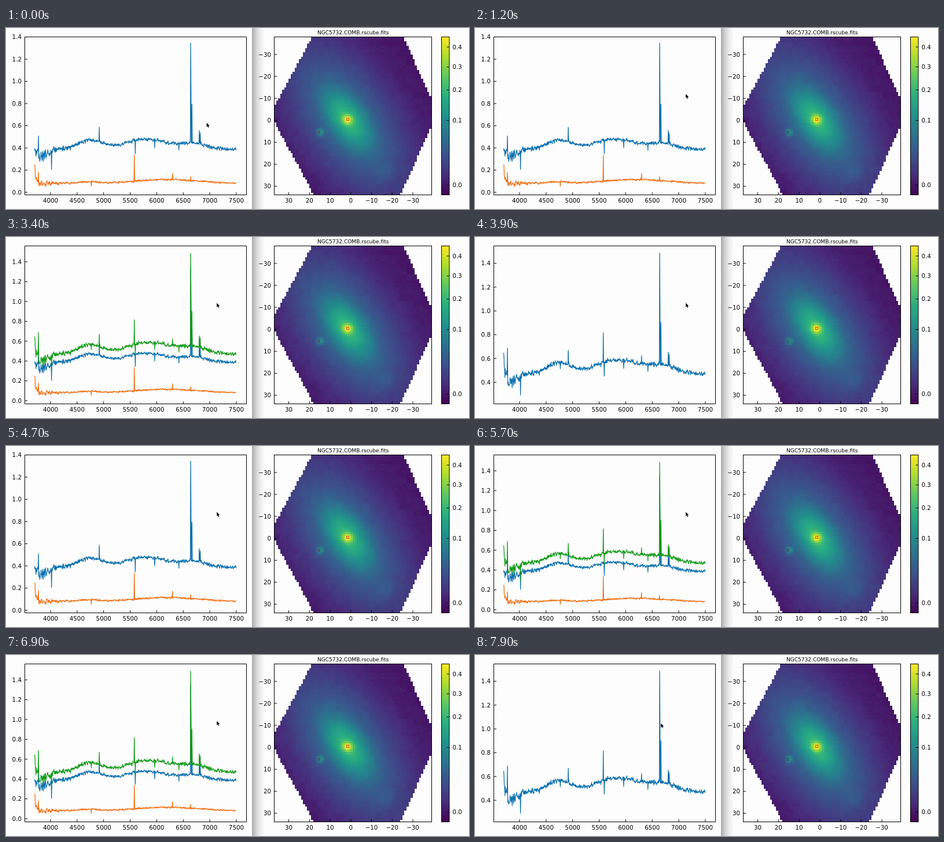
Recreate the animation shown at these times as an HTML page with a canvas. Size 800 by 314 pixels, loop 8000 ms.

```html
<!DOCTYPE html>
<html lang="en">
<head>
<meta charset="utf-8">
<title>Spectrum viewer</title>
<style>
  html, body { margin: 0; width: 100%; height: 100%; overflow: hidden; background: #fdfdfd; }
  canvas { display: block; }
</style>
</head>
<body>
<canvas id="stage" width="800" height="314"></canvas>
<script>
const LOOP = 8000, STEP = 100;
const BLUE = '#0a6fae', ORANGE = '#f26a0b', GREEN = '#109a16';
const VIRIDIS = ['#440154', '#472d7b', '#3b528b', '#2c728e', '#21918c', '#28ae80', '#5ec962', '#addc30', '#fde725'];
const TOP = 15.5, BOTTOM = 289.5, HEIGHT = BOTTOM - TOP;
const ctx = document.getElementById('stage').getContext('2d');

const hash = n => { const s = Math.sin(n * 12.9898) * 43758.5453; return s - Math.floor(s); };
const noise = n => hash(n) + hash(n + 0.37) - 1;
const bell = (x, center = 0, width = 1) => Math.exp(-(((x - center) / width) ** 2));
const smooth = p => { p = Math.min(1, Math.max(0, p)); return p * p * (3 - 2 * p); };
const signed = n => (n < 0 ? '\u2212' : '') + Math.abs(n);

// Spectra: smooth continuum, noise growing to the blue end, and narrow lines
const W0 = 3700, DW = 6, SAMPLES = 634;

function spectrum(continuum, noiseLevel, lines, seed) {
  const flux = Array.from({ length: SAMPLES }, (_, i) => {
    const w = W0 + i * DW;
    return continuum(w) + noiseLevel(w) * (noise(i + seed) + 0.7 * noise((i >> 1) + seed + 900));
  });
  for (const [w, height] of lines) flux[Math.round((w - W0) / DW)] = continuum(w) + height;
  return flux;
}

const galaxyFlux = spectrum(
  w => .388 + .08 * bell(w, 4750, 330) + .09 * bell(w, 5800, 550) + .05 * bell(w, 6700, 350) - .07 * bell(w, 3850, 130),
  w => .017 + .008 * bell(w, 4000, 600) + .04 * bell(w, 3820, 190),
  [[3772, .17], [4018, -.17], [4918, .13], [5595, -.12], [5962, -.07], [6418, -.06],
   [6640, .9], [6646, .5], [6664, .35], [6802, .12], [6820, .1]], 11);

const starFlux = spectrum(
  w => .08 + .015 * bell(w, 4700, 250) + .036 * bell(w, 6200, 800) + .16 * Math.exp((W0 - w) / 25),
  w => .009 + .025 * bell(w, 3700, 350),
  [[3772, .09], [4768, -.04], [5577, .235], [6298, .055], [6640, .035]], 407);

const sumFlux = galaxyFlux.map((f, i) => f + starFlux[i]);

const galaxy = [galaxyFlux, BLUE], star = [starFlux, ORANGE];
const MODES = {
  pair: { zero: 285, unit: 192.4, from: 0, curves: [galaxy, star] },
  all: { zero: 284, unit: 172.1, from: 0, curves: [galaxy, star, [sumFlux, GREEN]] },
  sum: { zero: 334.6, unit: 206.4, from: 2, curves: [[sumFlux, BLUE]] }
};
const SCHEDULE = [[7000, 'sum'], [5600, 'all'], [4200, 'pair'], [3500, 'sum'], [2100, 'all'], [0, 'pair']];

function viridis(v) {
  const p = Math.min(.999, Math.max(0, v)) * 8, i = Math.floor(p);
  return `color-mix(in srgb, ${VIRIDIS[i + 1]} ${(p - i) * 100}%, ${VIRIDIS[i]})`;
}

// Tilted elliptical disc with a bright core, a companion and a faint knot
function brightness(x, y, seed) {
  const dx = x - 590, dy = y - 159;
  const e = Math.hypot(.56 * dx + .83 * dy, (.83 * dx - .56 * dy) / .52);
  const spot = (cx, cy, r) => bell(Math.hypot(x - cx, y - cy) / r);
  return .05 + .33 * bell(e / 148) + .22 * Math.exp(-((e / 60) ** 3)) + .1 * bell(e / 24)
    + .33 * spot(590, 159, 8) + .27 * spot(543, 181, 6) + .06 * spot(653, 250, 14)
    + .01 * noise(seed) + .014 * noise(Math.floor(x / 11) * 31 + Math.floor(y / 11));
}

const insideField = (x, y) =>
  x > 463 + .54 * Math.max(0, Math.abs(y - 150) - 12) &&
  x < 735 - .45 * Math.max(0, Math.abs(y - 147) - 24);

function text(str, x, y, align, size = 10.3) {
  ctx.font = `${size}px "DejaVu Sans", sans-serif`;
  ctx.textAlign = align;
  ctx.fillStyle = '#000';
  ctx.fillText(str, x, y);
}

function line(x0, y0, x1, y1) {
  ctx.beginPath();
  ctx.moveTo(x0, y0);
  ctx.lineTo(x1, y1);
  ctx.stroke();
}

function frame(x, width) {
  ctx.strokeStyle = '#000';
  ctx.lineWidth = 1;
  ctx.strokeRect(x, TOP, width, HEIGHT);
}

function xTick(label, x) {
  line(x, BOTTOM, x, BOTTOM - 4.5);
  text(label, x, 303.2, 'center');
}

function yTick(label, axisX, y, side = -1) {
  line(axisX, y, axisX - side * 4.5, y);
  text(label, axisX + side * 5.5, y + 3.8, side < 0 ? 'right' : 'left');
}

function drawBackdrop() {
  ctx.fillStyle = '#fdfdfd';
  ctx.fillRect(0, 0, 800, 314);
  const shadow = ctx.createLinearGradient(425, 0, 447, 0);
  ['#ababab', '#d4d4d4', '#ededed', '#fdfdfd'].forEach((c, i) => shadow.addColorStop(i / 3, c));
  ctx.fillStyle = shadow;
  ctx.fillRect(425, 0, 22, 314);
}

function drawMap() {
  const cols = 76, rows = 72;
  const edgeX = col => Math.round(463 + col * 272 / cols);
  const edgeY = row => Math.round(TOP + row * HEIGHT / rows);
  for (let row = 0; row < rows; row++) {
    for (let col = 0; col < cols; col++) {
      const left = edgeX(col), top = edgeY(row), w = edgeX(col + 1) - left, h = edgeY(row + 1) - top;
      const x = left + w / 2, y = top + h / 2;
      if (!insideField(x, y)) continue;
      ctx.fillStyle = viridis(brightness(x, y, row * cols + col));
      ctx.fillRect(left, top, w, h);
    }
  }
  ctx.lineWidth = 1;
  ctx.strokeStyle = '#e0402c';
  ctx.strokeRect(588.5, 156.5, 4, 4);
  ctx.strokeStyle = '#6a3440';
  ctx.strokeRect(539.5, 179.5, 3, 3);

  frame(463.5, 272);
  for (let v = -30; v <= 30; v += 10) {
    xTick(signed(v), 595.8 - v * 3.575);
    yTick(signed(v), 463.5, 160.2 + v * 3.81);
  }
  text('NGC5732.COMB.rscube.fits', 599.7, 11, 'center', 9.05);
}

function drawColorbar() {
  const ramp = ctx.createLinearGradient(0, BOTTOM, 0, TOP);
  VIRIDIS.forEach((c, i) => ramp.addColorStop(i / 8, c));
  ctx.fillStyle = ramp;
  ctx.fillRect(752, TOP, 14, HEIGHT);
  frame(752.5, 13.5);
  [272.5, 160.5, 107.5, 67.5, 33].forEach((y, i) => yTick((i / 10).toFixed(1), 766, y, 1));
}

function drawSpectra({ zero, unit, from, curves }) {
  const toX = w => 77 + (w - 4000) * .0917;
  ctx.lineWidth = 1.25;
  ctx.lineJoin = 'round';
  for (const [flux, color] of curves) {
    ctx.strokeStyle = color;
    ctx.beginPath();
    flux.forEach((f, i) => ctx.lineTo(toX(W0 + i * DW), zero - f * unit));
    ctx.stroke();
  }
  frame(32.5, 383);
  for (let w = 4000; w <= 7500; w += 500) xTick(String(w), toX(w));
  for (let i = from; i <= 7; i++) yTick((i / 5).toFixed(1), 32.5, zero - i / 5 * unit);
}

const ARROW = new Path2D('M0 0V7.2L1.7 5.7L2.9 8.4L4.1 7.8L3 5.2H5.2Z');
function drawCursor(time) {
  const there = smooth((time - 100) / 800), back = smooth((time - 7300) / 500);
  ctx.save();
  ctx.translate(346.7 + 17.5 * there - 43.2 * back, 164.6 - 50 * there + 3.9 * back);
  ctx.lineWidth = 1;
  ctx.strokeStyle = '#fff';
  ctx.stroke(ARROW);
  ctx.fillStyle = '#000';
  ctx.fill(ARROW);
  ctx.restore();
}

// Everything but the spectra and the cursor stays the same
drawBackdrop();
drawMap();
drawColorbar();
const still = document.createElement('canvas');
still.width = 800;
still.height = 314;
still.getContext('2d').drawImage(ctx.canvas, 0, 0);

function render() {
  const time = Math.floor(performance.now() % LOOP / STEP) * STEP;
  ctx.drawImage(still, 0, 0);
  drawSpectra(MODES[SCHEDULE.find(([start]) => time >= start)[1]]);
  drawCursor(time);
  requestAnimationFrame(render);
}
render();
</script>
</body>
</html>
```
